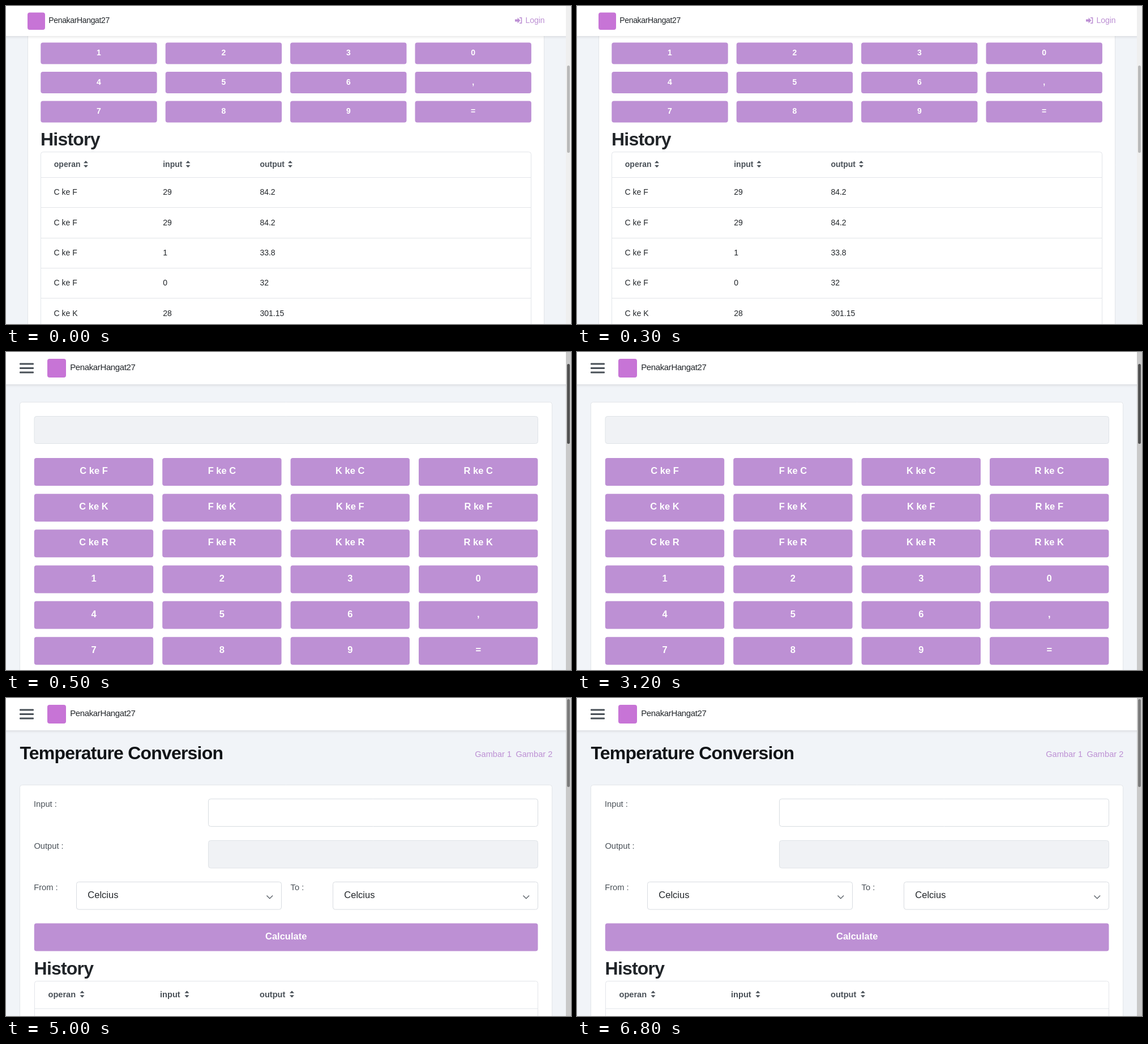
An HTML page with a canvas for the animation above (8 s loop, 998 by 561 pixels).

```html
<!DOCTYPE html>
<html lang="id">
<head>
<meta charset="utf-8">
<title>Temperature Conversion</title>
<style>
  html, body { margin: 0; width: 100%; height: 100%; overflow: hidden; background: #f1f4f8; }
  canvas { display: block; width: 998px; height: 561px; }
</style>
</head>
<body>
<canvas id="stage"></canvas>
<script>
const W = 998, H = 561, LOOP = 8000;
const BRAND = 'PenakarHangat27';
const PURPLE = '#bd90d4', INK = '#212529', SLATE = '#495057', LINE = '#e2e5e9', GREY = '#f0f2f5';
const canvas = document.getElementById('stage');
const ctx = canvas.getContext('2d');
const dpr = window.devicePixelRatio || 1;
canvas.width = W * dpr;
canvas.height = H * dpr;

function rect(x, y, w, h, fill) {
  ctx.fillStyle = fill;
  ctx.fillRect(x, y, w, h);
}

function box(x, y, w, h, r, fill, stroke) {
  ctx.beginPath();
  ctx.roundRect(x, y, w, h, r);
  ctx.fillStyle = fill;
  ctx.fill();
  if (stroke) {
    ctx.strokeStyle = stroke;
    ctx.lineWidth = 1;
    ctx.stroke();
  }
}

function poly(points, fill) {
  ctx.beginPath();
  points.forEach(([x, y]) => ctx.lineTo(x, y));
  ctx.closePath();
  ctx.fillStyle = fill;
  ctx.fill();
}

function path(points, color, width) {
  ctx.beginPath();
  points.forEach(([x, y]) => ctx.lineTo(x, y));
  ctx.strokeStyle = color;
  ctx.lineWidth = width;
  ctx.stroke();
}

// y is the middle of the capital letters
function text(str, x, y, size, { color = INK, bold = false, align = 'left', track = 0 } = {}) {
  ctx.font = `${bold ? 'bold ' : ''}${size}px "Liberation Sans", Arial, sans-serif`;
  ctx.letterSpacing = `${track * size}px`;
  ctx.textAlign = align;
  ctx.fillStyle = color;
  ctx.fillText(str, x, y + size * 0.344);
}

function button(label, x, y, w, h, size, textY) {
  box(x, y, w, h, 4, PURPLE);
  text(label, x + w / 2, textY, size, { color: '#fff', bold: true, align: 'center' });
}

function grid(rows, x, y, dx, dy, w, h, size, lift) {
  rows.forEach((row, r) => row.forEach((label, c) => {
    const top = y + r * dy;
    button(label, x + c * dx, top, w, h, size, top + h / 2 - lift);
  }));
}

function heading(str, x, y, color) {
  text(str, x, y, 32, { color, bold: true, track: -0.025 });
}

function column(label, x, iconX, y, size) {
  text(label, x, y, size, { color: SLATE, bold: true });
  poly([[iconX - 4, y - 1.8], [iconX, y - 6], [iconX + 4, y - 1.8]], SLATE);
  poly([[iconX - 4, y + 1.8], [iconX, y + 6], [iconX + 4, y + 1.8]], SLATE);
}

function header(h) {
  ctx.save();
  ctx.shadowColor = 'rgba(0,0,0,.1)';
  ctx.shadowBlur = 4 * dpr;
  ctx.shadowOffsetY = 1.5 * dpr;
  rect(-10, -10, 1010, h + 10, '#fff');
  ctx.restore();
}

function scrollbar(top, bottom, track, thumb) {
  rect(989, 0, 9, H, track);
  box(991, top, 5, bottom - top, 2.5, thumb);
}

function mobileHeader() {
  header(57);
  [21, 28.5, 36].forEach(y => box(24, y - 1.5, 25, 3, 1, SLATE));
  box(73, 12, 33, 33, 4, '#c774d6');
  text(BRAND, 113.2, 27.3, 15, { track: -0.025 });
}

const DIGITS = [['1', '2', '3', '0'], ['4', '5', '6', ','], ['7', '8', '9', '=']];
const UNITS = ['F', 'K', 'R'];
const CONVERSIONS = [
  ['C ke F', 'F ke C', 'K ke C', 'R ke C'],
  ['C ke K', 'F ke K', 'K ke F', 'R ke F'],
  ['C ke R', 'F ke R', 'K ke R', 'R ke K']
];
const HISTORY = [
  ['C ke F', '29', '84.2'],
  ['C ke F', '29', '84.2'],
  ['C ke F', '1', '33.8'],
  ['C ke F', '0', '32'],
  ['C ke K', '28', '301.15']
];

function desktopHistory() {
  box(38.5, -20, 912, 620, 0, '#fff', LINE);
  grid(DIGITS, 61.3, 64.5, 220.4, 51.5, 205.4, 38, 14, 1);
  heading('History', 61, 234.5, INK);

  box(61.5, 257.5, 866, 330, 4, '#fff', LINE);
  column('operan', 84.8, 141, 279, 14);
  column('input', 277.2, 321.5, 279, 14);
  column('output', 448.4, 502, 279, 14);
  HISTORY.forEach((row, i) => {
    rect(62, Math.round(302 + i * 53.33), 865, 1, LINE);
    [84.6, 277.3, 448.4].forEach((x, c) => text(row[c], x, 328.5 + i * 53.33, 14));
  });

  header(53);
  box(38, 11.5, 31, 30.5, 4, '#c774d6');
  text(BRAND, 75.3, 25.3, 14, { track: -0.025 });
  poly([[899, 23.6], [903.6, 23.6], [903.6, 20.6], [908.4, 25.5],
        [903.6, 30.4], [903.6, 27.4], [899, 27.4]], PURPLE);
  path([[907, 20.8], [910.5, 20.8], [910.5, 30.2], [907, 30.2]], PURPLE, 1.6);
  text('Login', 917.4, 25.5, 14, { color: PURPLE });
  scrollbar(105, 259, '#efefef', '#b9b9b9');
}

function keypad() {
  box(24.5, 88.5, 940, 520, 4, '#fff', LINE);
  box(50, 113.5, 889.5, 48, 4, GREY, '#dfe3e7');
  grid(CONVERSIONS.concat(DIGITS), 49.8, 187, 226.4, 63.15, 210.4, 49, 16.5, 2);
  mobileHeader();
  scrollbar(21, 162, '#c9c9c9', '#515151');
}

function select(x) {
  box(x, 324.5, 362, 48.5, 4, '#fff', '#d8dce1');
  text('Celcius', x + 19.8, 347.7, 16.5);
  path([[x + 336, 348.5], [x + 341.3, 353.8], [x + 346.6, 348.5]], '#62686f', 1.5);
}

function form() {
  const label = (str, x, y) => text(str, x, y, 14.7, { color: SLATE });
  heading('Temperature Conversion', 24.4, 97, '#111417');
  text('Gambar 1', 828.2, 99, 14.6, { color: PURPLE });
  text('Gambar 2', 900.4, 99, 14.6, { color: PURPLE });

  box(24.5, 153.5, 940, 460, 4, '#fff', LINE);
  label('Input :', 49, 186.8);
  box(357.5, 178, 582, 48.5, 4, '#fff', '#d8dce1');
  label('Output :', 49.4, 260.5);
  box(357.5, 251.5, 582, 48.5, 4, GREY, '#dfe3e7');
  label('From :', 49.2, 333.5);
  select(124.5);
  label('To :', 502.6, 333.5);
  select(577.5);
  button('Calculate', 49.8, 397.5, 889.7, 49, 16.5, 420.5);
  heading('History', 49.6, 477, INK);

  box(50.5, 499.5, 889, 100, 4, '#fff', LINE);
  column('operan', 74.5, 134.5, 522.5, 14.6);
  column('input', 272, 319.5, 522.5, 14.6);
  column('output', 448, 505, 522.5, 14.6);
  rect(51, 547.5, 888, 1, LINE);

  mobileHeader();
  scrollbar(2, 157, '#c9c9c9', '#7b7b7b');
}

function draw(t) {
  ctx.setTransform(dpr, 0, 0, dpr, 0, 0);
  rect(0, 0, W, H, '#f1f4f8');
  if (t < 500) desktopHistory();
  else if (t < 5000) keypad();
  else form();
}

const start = performance.now();
function tick() {
  draw((performance.now() - start) % LOOP);
  requestAnimationFrame(tick);
}
tick();
</script>
</body>
</html>
```
